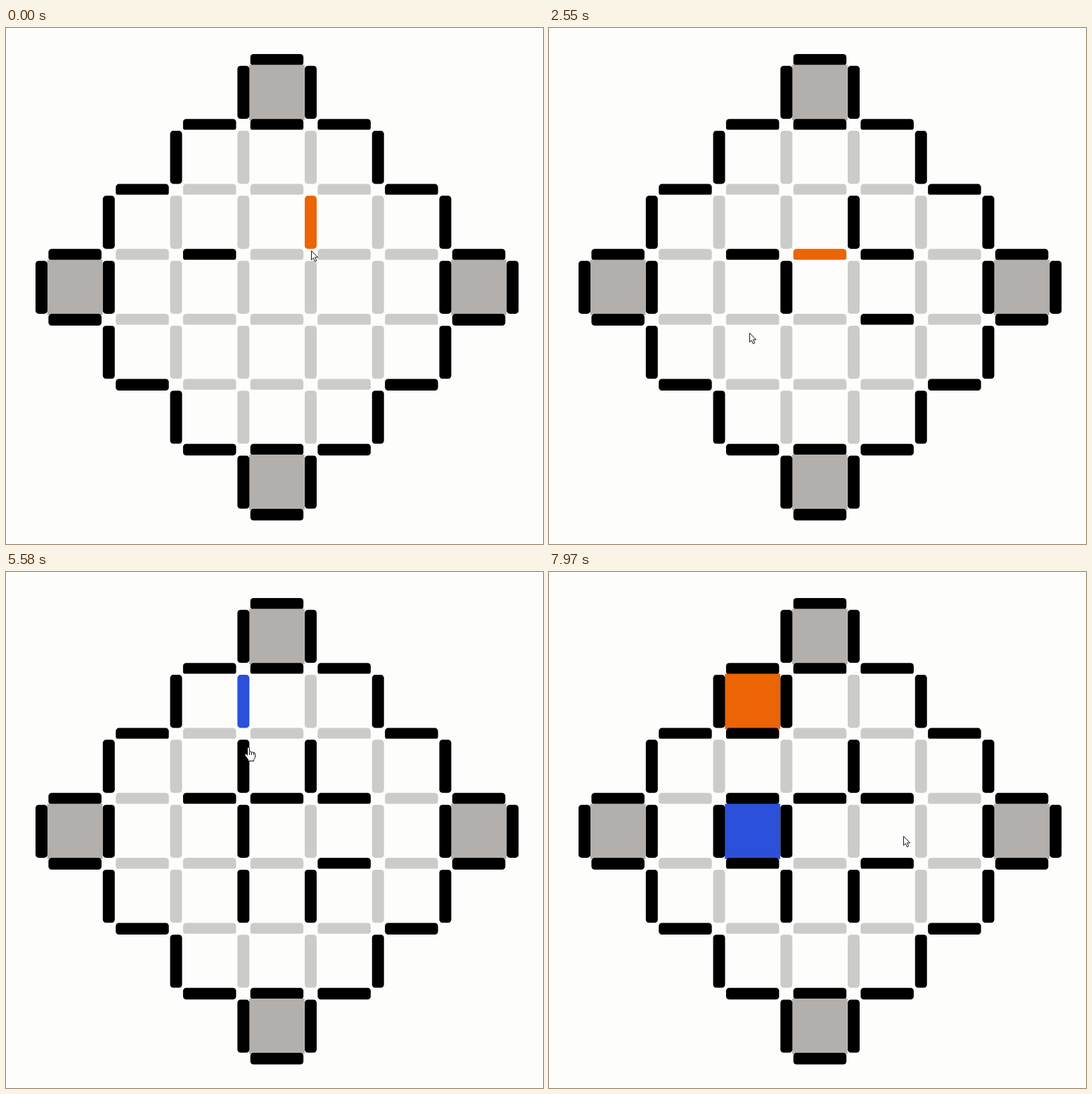
An HTML page with a canvas that plays this animation: 764x733 px, repeating every 7990 ms.

```html
<!DOCTYPE html>
<html lang="en">
<head>
<meta charset="utf-8">
<title>Dots and boxes</title>
<style>
  html, body { margin: 0; width: 100%; height: 100%; overflow: hidden; background: #fdfdfb; }
  canvas { display: block; }
</style>
</head>
<body>
<canvas id="board" width="764" height="733"></canvas>
<script>
const ctx = document.getElementById('board').getContext('2d');
const LOOP = 7990, SIZE = 7, MID = 3;
const PAGE = '#fdfdfb', FREE = '#cbcbc9', WALL = '#b2afad', INK = '#15151c';
const ORANGE = '#eb6405', BLUE = '#2b50d9';
const STEP_X = 95.75, STEP_Y = 92.28;
const REPLY = 700, LEAD = 100, HOLD = 200;

// Edge names: h = above the cell, v = left of it, then row and column.
// Blue clicks an edge, orange replies; rest is where the pointer wanders next.
const turns = [
  { click: 240, edge: 'h34', replies: ['v33'] },
  { click: 1290, edge: 'h44', replies: ['h33'], rest: { t: 2550, x: 285, y: 433 } },
  { click: 3200, edge: 'v43', replies: ['v44'], rest: { t: 4650, x: 348, y: 275 } },
  { click: 5190, edge: 'v13', replies: ['h22', 'v32'], rest: { t: 6690, x: 357, y: 351 } },
  { click: 7270, edge: 'h42', replies: [], rest: { t: 7970, x: 504, y: 375 } }
];

const inside = (row, col) => Math.abs(row - MID) + Math.abs(col - MID) <= MID;
const corner = (row, col) => inside(row, col) && (row % 6 === 0 || col % 6 === 0);

// All edges and cells in paint order: each cell trims the bar above it.
const parts = [], edges = {}, cells = [];

function addEdge(dir, row, col) {
  const other = dir === 'h' ? [row - 1, col] : [row, col - 1];
  if (!inside(row, col) && !inside(...other)) return;
  const fixed = !inside(row, col) || !inside(...other) ||
    corner(row, col) || corner(...other);
  const x = col * STEP_X, y = row * STEP_Y;
  const rect = dir === 'h'
    ? { x: x + 60.4, y: y + 37, w: 75.5, h: 16.6 }
    : { x: x + 42, y: y + 53.8, w: 17, h: 75.3 };
  const edge = { fixed, shown: fixed ? -1 : Infinity, ...rect };
  edges[dir + row + col] = edge;
  parts.push(edge);
}

function addCell(row, col) {
  if (!inside(row, col)) return;
  const cell = {
    sides: ['h' + row + col, 'h' + (row + 1) + col, 'v' + row + col, 'v' + row + (col + 1)],
    fill: corner(row, col) ? WALL : PAGE, shown: Infinity,
    x: 58.7 + col * STEP_X, y: 52.3 + row * STEP_Y, w: 78.8, h: 78.6
  };
  cells.push(cell);
  parts.push(cell);
}

for (let row = 0; row <= SIZE; row++) {
  for (let col = 0; col < SIZE; col++) addEdge('h', row, col);
  for (let col = 0; col < SIZE; col++) addCell(row, col);
  for (let col = 0; col <= SIZE; col++) addEdge('v', row, col);
}

// A move is highlighted until the next one, unless it closes a box.
let last = null;
function play(name, time, color) {
  if (last) last.until = time;
  last = Object.assign(edges[name], { shown: time, until: LOOP, color });
  for (const cell of cells) {
    if (!cell.sides.includes(name)) continue;
    if (cell.sides.some(side => edges[side].shown > time)) continue;
    cell.shown = time;
    cell.color = color;
    last.color = '#000';
  }
}

// Pointer stops: each click falls slightly past the middle of its edge.
const stops = [{ t: 0, x: 433, y: 316 }];
function clickPoint({ x, y, w, h }) {
  return w > h ? { x: x + w * 0.55, y: y + h / 2 } : { x: x + w / 2, y: y + h * 0.55 };
}

play('h32', -1, BLUE);
play('v24', -1, ORANGE);
for (const { click, edge, replies, rest } of turns) {
  play(edge, click, BLUE);
  replies.forEach((reply, i) => play(reply, click + REPLY * (i + 1), ORANGE));
  const point = clickPoint(edges[edge]);
  stops.push({ t: click - LEAD, ...point }, { t: click + HOLD, ...point });
  if (rest) stops.push(rest);
}

function pointerAt(t) {
  const next = stops.findIndex(stop => stop.t > t);
  if (next < 0) return stops[stops.length - 1];
  const a = stops[next - 1], b = stops[next];
  const k = 1 - (1 - (t - a.t) / (b.t - a.t)) ** 3;
  return { x: Math.round(a.x + (b.x - a.x) * k), y: Math.round(a.y + (b.y - a.y) * k) };
}

const contains = (r, p) => p.x >= r.x && p.x < r.x + r.w && p.y >= r.y && p.y < r.y + r.h;

const ARROW = new Path2D('M.5 .5V13.3L3.4 10.6L5.4 15.6L7.7 14.6L5.7 9.8H9.7Z');
const HAND = new Path2D('M-1.5 11V1.5Q-1.5 0 0 0T1.5 1.5V6.5Q3 5.2 4.4 7Q5.8 6 7 7.7' +
  'Q9.5 7 9.5 9.5V13Q9.5 15.5 7.5 17.5V19.5H-.5V17.5L-5 11.5Q-5.5 9.5 -3.5 9.3Z');

function drawCursor({ x, y }, hand) {
  const shape = hand ? HAND : ARROW;
  ctx.save();
  ctx.translate(Math.round(x), Math.round(y));
  ctx.fillStyle = '#fff';
  ctx.strokeStyle = INK;
  ctx.lineJoin = 'round';
  ctx.fill(shape);
  ctx.stroke(shape);
  ctx.fillStyle = INK;
  if (hand) for (let dx = 1; dx < 8; dx += 3) ctx.fillRect(dx, 7, 1, 4);
  ctx.restore();
}

function edgeColor(edge, t, hover) {
  if (edge.color && t >= edge.shown && t < edge.until) return edge.color;
  return t >= edge.shown || hover ? '#000' : FREE;
}

function draw(t) {
  const pointer = pointerAt(t);
  let hand = false;
  ctx.fillStyle = PAGE;
  ctx.fillRect(0, 0, 764, 733);
  for (const part of parts) {
    ctx.beginPath();
    if (part.sides) {
      ctx.fillStyle = t >= part.shown ? part.color : part.fill;
      ctx.rect(part.x, part.y, part.w, part.h);
    } else {
      const hover = t < part.shown && contains(part, pointer);
      hand = hand || hover;
      ctx.fillStyle = edgeColor(part, t, hover);
      ctx.roundRect(part.x, part.y, part.w, part.h, 4.5);
    }
    ctx.fill();
  }
  drawCursor(pointer, hand);
}

function tick() {
  draw(performance.now() % LOOP);
  requestAnimationFrame(tick);
}
tick();
</script>
</body>
</html>
```
